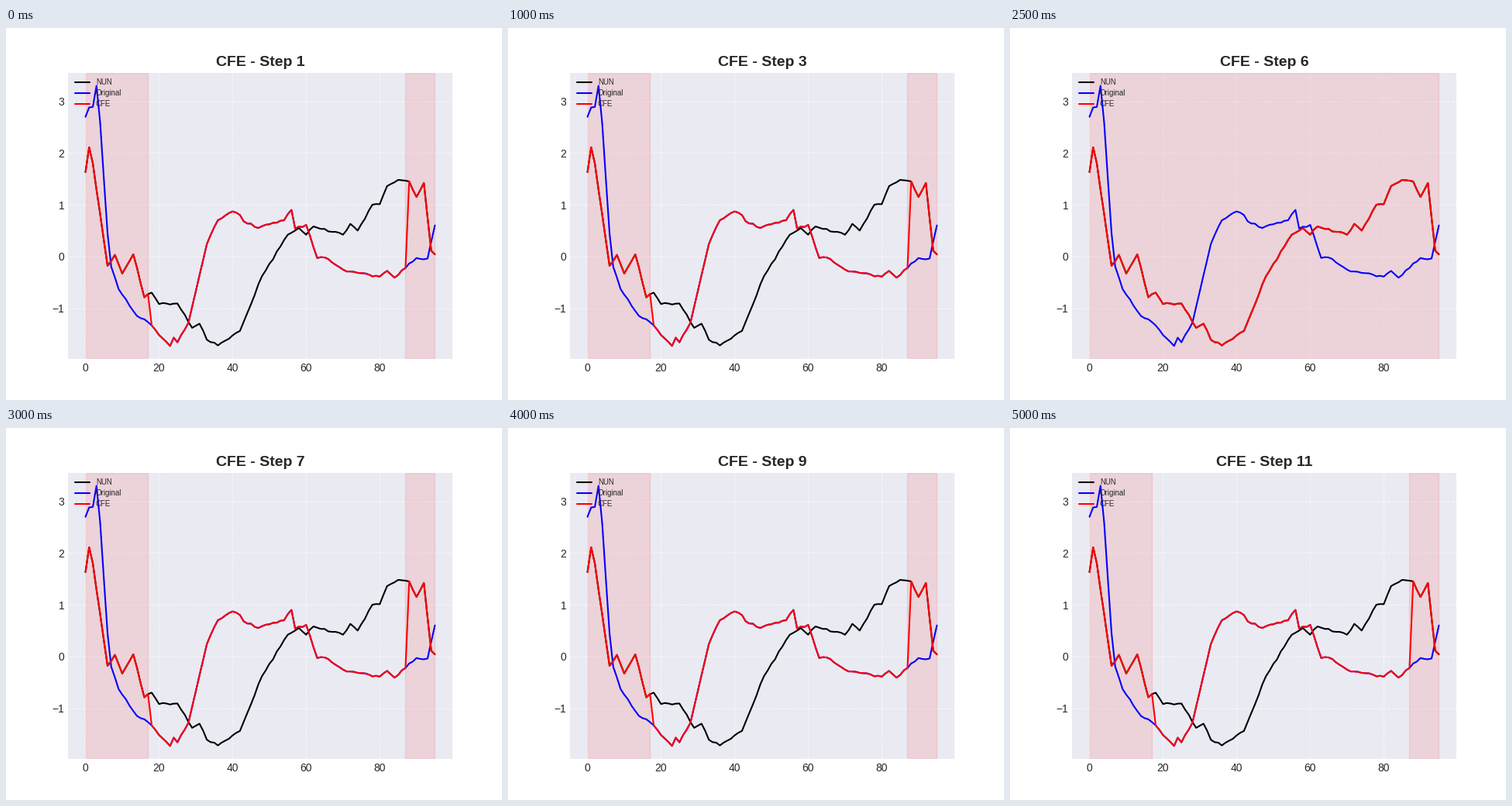
These frames come from a looping animation (640x480 px, 5.5 s). A matplotlib script:

```python
import numpy as np
import matplotlib.pyplot as plt
from matplotlib.animation import FuncAnimation

STEPS, INTERVAL = 11, 500
INK = "0.15"

plt.rcParams.update({
    "font.family": "Liberation Sans",
    "font.size": 10,
    "text.color": INK,
    "axes.facecolor": "#EAEAF2",
    "axes.axisbelow": True,
    "lines.linewidth": 1.5,
    "lines.solid_capstyle": "round",
})

t = np.arange(96)
rng = np.random.default_rng(4)


def series(*turns, jitter=0.02):
    """Join (time, value) turning points, with a little noise between them."""
    at, value = np.transpose(turns)
    noise = rng.uniform(-jitter, jitter, t.size)
    return np.interp(t, at, value) + np.where(np.isin(t, at), 0, noise)


nun = series(
    (0, 1.63), (1, 2.11), (2, 1.8), (6, -.18), (8, .03), (10, -.33), (13, .04),
    (16, -.79), (18, -.7), (20, -.92), (25, -.91), (29, -1.38), (31, -1.3),
    (33, -1.61), (36, -1.72), (42, -1.44), (48, -.38), (55, .42), (58, .55),
    (60, .42), (62, .58), (70, .42), (72, .63), (74, .5), (78, 1), (80, 1.01),
    (82, 1.36), (85, 1.48), (88, 1.45), (90, 1.15), (92, 1.42), (94, .11),
    (95, .04))

query = series(
    (0, 2.7), (1, 2.88), (2, 2.89), (3, 3.3), (4, 2.58), (6, .45), (7, -.2),
    (9, -.63), (14, -1.15), (17, -1.27), (23, -1.73), (24, -1.57), (25, -1.66),
    (28, -1.28), (33, .24), (36, .7), (40, .87), (42, .8), (43, .68), (47, .55),
    (54, .7), (56, .9), (57, .54), (60, .61), (63, -.03), (65, -.02),
    (71, -.29), (80, -.39), (82, -.28), (84, -.41), (86, -.27), (90, -.03),
    (93, -.04), (95, .6))

partial = np.where((t <= 17) | (t >= 88), nun, query)

fig, ax = plt.subplots(figsize=(6.4, 4.8), dpi=100)
ax.plot(t, nun, color="black", label="NUN")
ax.plot(t, query, color="blue", label="Original")
cfe, = ax.plot(t, partial, color="red", label="CFE")


def span(start, end):
    return ax.axvspan(start, end, color="red", alpha=0.1, lw=1)


edge_spans = [span(0, 17), span(87, 95)]
full_span = span(0, 95)

ax.set_xlim(-4.75, 99.75)
ax.set_ylim(-1.984, 3.553)
ax.set_xticks(range(0, 81, 20))
ax.set_yticks(range(-1, 4))
ax.tick_params(length=0, pad=3.5, labelcolor=INK)
ax.grid(color="white", linestyle="--", linewidth=0.8, alpha=0.6)
ax.spines[:].set_visible(False)
ax.legend(loc="upper left", bbox_to_anchor=(0, 1.003), fontsize=7,
          labelspacing=0.42, frameon=False)
title = ax.set_title("", fontsize=14, fontweight="bold")


def update(i):
    # The explanation alternates between two segments and the whole series.
    whole = i % 2 == 1
    cfe.set_ydata(nun if whole else partial)
    full_span.set_visible(whole)
    for s in edge_spans:
        s.set_visible(not whole)
    title.set_text(f"CFE - Step {i + 1}")
    return cfe, full_span, *edge_spans, title


anim = FuncAnimation(fig, update, frames=STEPS, interval=INTERVAL,
                     repeat=True, repeat_delay=0, blit=False)
plt.show()
```
